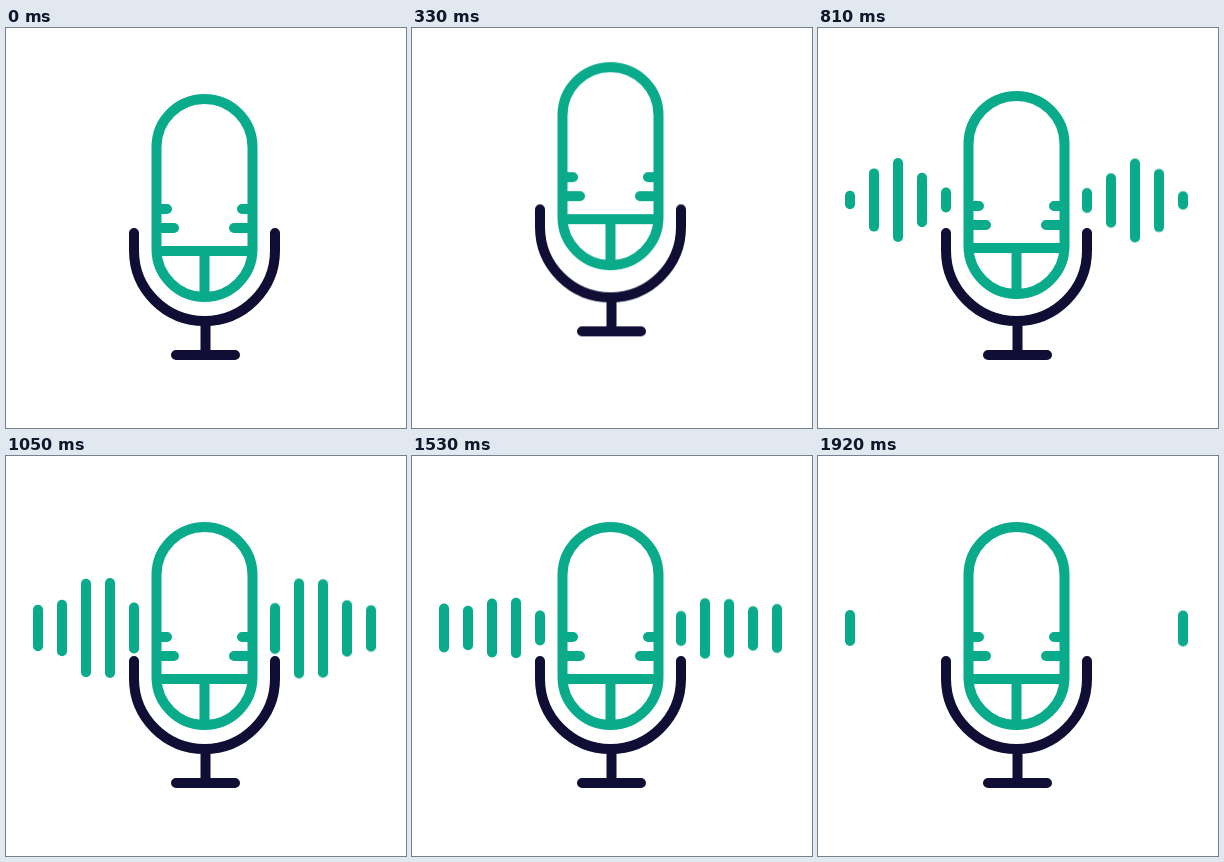
Animation of 400 by 400 pixels, one loop 2.95 s. Source, as an HTML page without scripts:

```html
<!DOCTYPE html>
<html lang="en">
<head>
<meta charset="utf-8">
<title>Microphone</title>
<style>
  @property --k { syntax: "<number>"; inherits: false; initial-value: 0; }

  :root { --loop: 2950ms; --ease: cubic-bezier(.37, 0, .63, 1); }
  html, body { margin: 0; width: 100%; height: 100%; overflow: hidden; background: #fff; }
  svg { display: block; width: 100%; height: 100%; }

  .mic, .stand { fill: none; stroke-width: 10; stroke-linecap: round; }
  .mic { stroke: #0aab8a; animation: hop var(--loop) var(--ease) infinite; }
  .stand { stroke: #100e34; animation: lift var(--loop) var(--ease) infinite; }

  @keyframes hop {
    0%, 21.86%, 33.56%, 100% { transform: translateY(0); }
    9.15% { transform: translateY(-34px); }
    27.46% { transform: translateY(-3px); }
  }
  @keyframes lift {
    0%, 24.41%, 100% { transform: translateY(0); }
    12.2% { transform: translateY(-24px); }
  }

  /* --n: place counted outwards from the mic, --a: peak reach, --k: wave level */
  rect.bar {
    --reach: calc(var(--a) * var(--k) * 1px);
    x: calc(123px - 24px * var(--n));
    y: calc(167px - var(--reach));
    width: 10px;
    height: calc(10px + 2 * var(--reach));
    rx: 5px;
    fill: #0aab8a;
    opacity: 0;
    animation: wave var(--loop) var(--ease) infinite, show var(--loop) step-end infinite;
    animation-delay: calc(540ms + 60ms * var(--n));
  }
  .n0 { --n: 0; --a: 20.5; }
  .n1 { --n: 1; --a: 50; }
  .n2 { --n: 2; --a: 68; }
  .n3 { --n: 3; --a: 55; }
  .n4 { --n: 4; --a: 50; }
  rect.n4 { animation-name: wave, linger; }

  @keyframes wave {
    0% { --k: 0; }
    4.07% { --k: .56; }
    9.66% { --k: .36; }
    17.29% { --k: 1; }
    27.8% { --k: .31; }
    34.24% { --k: .62; }
    38.64%, 100% { --k: .26; }
  }
  @keyframes show {
    0% { opacity: 1; }
    40.3%, 100% { opacity: 0; }
  }
  /* the outer bars stay until the loop restarts */
  @keyframes linger {
    0% { opacity: 1; }
    73.56%, 100% { opacity: 0; }
  }
</style>
</head>
<body>
<svg viewBox="0 0 400 400">
  <g>
    <rect class="bar n0"/>
    <rect class="bar n1"/>
    <rect class="bar n2"/>
    <rect class="bar n3"/>
    <rect class="bar n4"/>
  </g>
  <g transform="translate(397 .5) scale(-1 1)">
    <rect class="bar n0"/>
    <rect class="bar n1"/>
    <rect class="bar n2"/>
    <rect class="bar n3"/>
    <rect class="bar n4"/>
  </g>
  <g class="stand">
    <path d="M128 205V222.5A70.5 70.5 0 0 0 269 222.5V205"/>
    <path d="M199.5 293V327M170 327H229"/>
  </g>
  <g class="mic">
    <rect x="150.5" y="71" width="96" height="198" rx="48"/>
    <path d="M151 181H161M151 200H168M246 181H236M246 200H228"/>
    <path d="M151 223H246M198.5 223V269"/>
  </g>
</svg>
</body>
</html>
```
